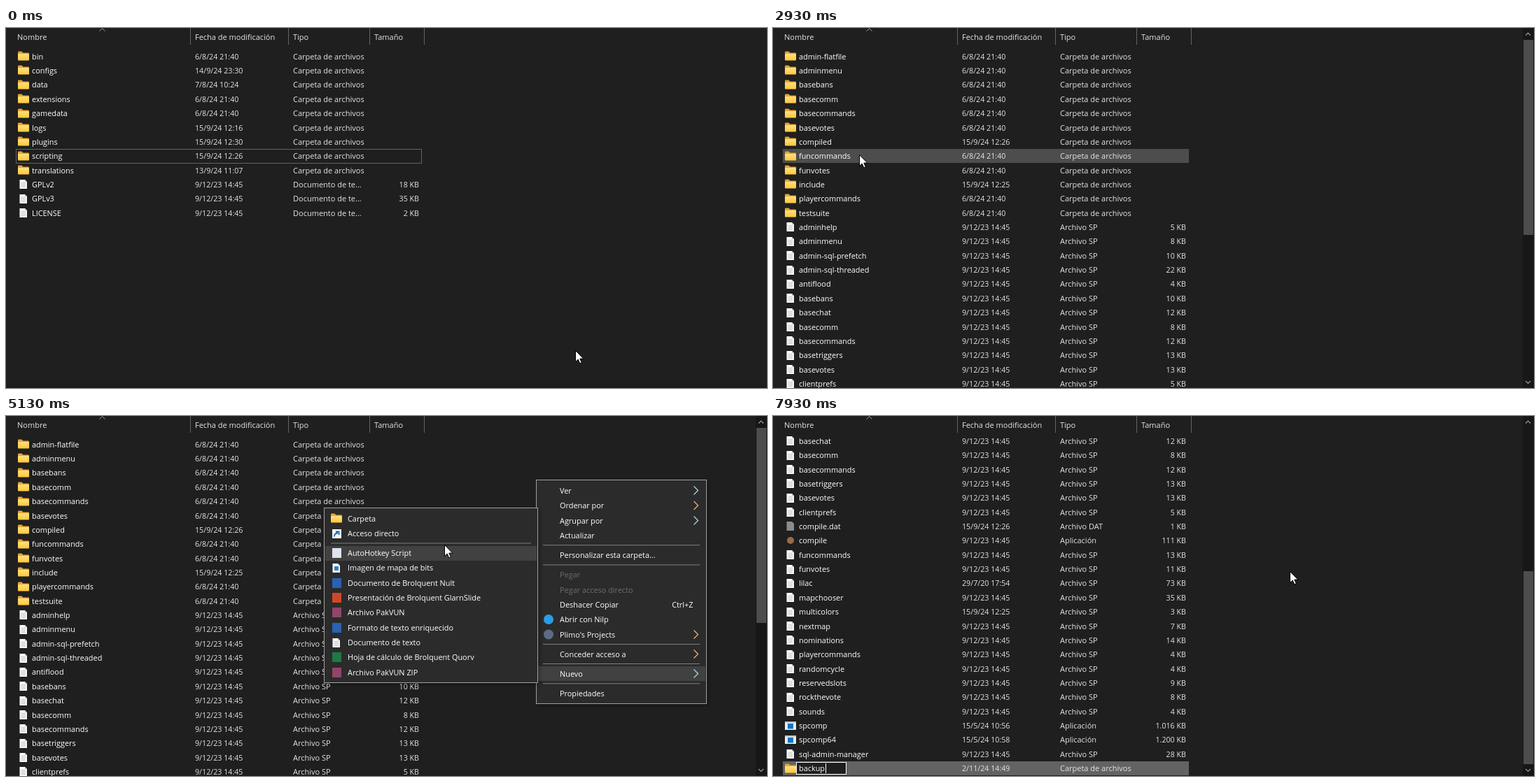
An HTML page for the animation above (8000 ms loop, 1087 by 515 pixels).

```html
<!DOCTYPE html>
<html lang="es">
<head>
<meta charset="utf-8">
<title>Explorador</title>
<style>
  html, body { margin: 0; width: 100%; height: 100%; overflow: hidden; background: #1f1f1f; }
  svg { display: block; }
  text { font: 500 10.9px "Open Sans", "Noto Sans", sans-serif; fill: #fff; }
  .meta { font-weight: 400; font-size: 11px; fill: #e4e4e4; }
  .num { font-weight: 400; font-size: 10.7px; fill: #e4e4e4; }
  .end { text-anchor: end; }
  .off { fill: #6d6d6d; }
  .panel { filter: drop-shadow(3px 3px 2px rgba(0, 0, 0, .25)); }
</style>
</head>
<body>
<svg id="stage" width="1087" height="515" viewBox="0 0 1087 515">
  <defs>
    <linearGradient id="gold" x2="0" y2="1">
      <stop stop-color="#ffdf80"/><stop offset="1" stop-color="#ffc838"/>
    </linearGradient>
    <g id="folder">
      <path d="M0 1.8Q0 .5 1.2.5H5.4L7.4 2.5H14.8Q16 2.5 16 3.7V8H0Z" fill="#e9a52f"/>
      <rect y="4" width="16" height="9.5" rx="1" fill="url(#gold)"/>
    </g>
    <g id="doc">
      <path d="M2.5 1H10L13 4V14H2.5Z" fill="#f8f8f8"/>
      <path d="M10 1V4H13" fill="#c4c4c4"/>
      <path d="M4.5 5.5H11M4.5 7.5H11M4.5 9.5H11M4.5 11.5H11" stroke="#b4b4b4" stroke-width=".7"/>
    </g>
    <path id="dat" d="M2.5 1H10L13 4V14H2.5Z" fill="#8b8b8b"/>
    <circle id="brown" cx="8" cy="7" r="5" fill="#9a6b45"/>
    <g id="app">
      <rect y="1" width="16" height="12" fill="#e9eef2"/>
      <rect y="1" width="16" height="2" fill="#b9c4cc"/>
      <rect x="4" y="4" width="8" height="7.5" fill="#0a78c8"/>
    </g>
    <g id="link">
      <rect x="2" y="1" width="13" height="13" fill="#f4f4f4"/>
      <path d="M5 11.5C5 8 7 6.5 10 6.5M7 4.5H11.5V9" fill="none" stroke="#1769b5" stroke-width="1.8"/>
    </g>
    <g id="bitmap">
      <path d="M2.5 1H10L13 4V14H2.5Z" fill="#f8f8f8"/>
      <rect x="5" y="5" width="6" height="6" fill="#2b7fd0"/>
    </g>
    <path id="arrow" d="M.5.5V16.6L4.2 13.1 6.8 18.8 9.3 17.7 6.8 12.1H11.8Z" fill="#fff" stroke="#000"/>
  </defs>
  <g id="scene"></g>
</svg>
<script>
const LOOP = 8000, TICK = 1000 / 15, PITCH = 20.36;
const TOP = 40.6, TOP_SCROLLED = 35.8;
const scene = document.getElementById('scene');
const measure = document.createElement('canvas').getContext('2d');

const KINDS = {
  d: ['folder', 'Carpeta de archivos', '6/8/24 21:40'],
  t: ['doc', 'Documento de te...', '9/12/23 14:45'],
  s: ['doc', 'Archivo SP', '9/12/23 14:45'],
  x: ['dat', 'Archivo DAT', '15/9/24 12:26'],
  c: ['brown', 'Aplicación', '9/12/23 14:45'],
  a: ['app', 'Aplicación', '15/5/24 10:56']
};

// Each entry: kind:name:size:date, with the date defaulting to the kind's own.
const parse = list => list.trim().split(/\s*,\s*/).map(entry => {
  const [kind, name, size, ...date] = entry.split(':');
  const [icon, type, usual] = KINDS[kind];
  return { icon, name, type, size: size ? size + ' KB' : '', date: date.join(':') || usual };
});

const rootRows = parse(`d:bin, d:configs::14/9/24 23:30, d:data::7/8/24 10:24, d:extensions, d:gamedata,
  d:logs::15/9/24 12:16, d:plugins::15/9/24 12:30, d:scripting::15/9/24 12:26,
  d:translations::13/9/24 11:07, t:GPLv2:18, t:GPLv3:35, t:LICENSE:2`);
const scriptRows = parse(`d:admin-flatfile, d:adminmenu, d:basebans, d:basecomm, d:basecommands, d:basevotes,
  d:compiled::15/9/24 12:26, d:funcommands, d:funvotes, d:include::15/9/24 12:25, d:playercommands, d:testsuite,
  s:adminhelp:5, s:adminmenu:8, s:admin-sql-prefetch:10, s:admin-sql-threaded:22, s:antiflood:4, s:basebans:10,
  s:basechat:12, s:basecomm:8, s:basecommands:12, s:basetriggers:13, s:basevotes:13, s:clientprefs:5,
  x:compile.dat:1, c:compile:111, s:funcommands:13, s:funvotes:11, s:lilac:73:29/7/20 17:54, s:mapchooser:35,
  s:multicolors:3:15/9/24 12:25, s:nextmap:7, s:nominations:14, s:playercommands:4, s:randomcycle:4,
  s:reservedslots:9, s:rockthevote:8, s:sounds:4, a:spcomp:1.016, a:spcomp64:1.200:15/5/24 10:58,
  s:sql-admin-manager:28, d:::2/11/24 14:49`);

const BLUE = '#b5dbe8', AMBER = '#f0b878';
const mainMenu = [
  { y: 106.5, label: 'Ver', more: BLUE }, { y: 128, label: 'Ordenar por', more: AMBER },
  { y: 149.5, label: 'Agrupar por', more: BLUE }, { y: 170.5, label: 'Actualizar' },
  { y: 199, label: 'Personalizar esta carpeta...' },
  { y: 227, label: 'Pegar', off: true }, { y: 248.5, label: 'Pegar acceso directo', off: true },
  { y: 269.5, label: 'Deshacer Copiar', keys: 'Ctrl+Z' },
  { y: 291, label: 'Abrir con Nilp', dot: '#2a9de4' },
  { y: 312.5, label: "Plimo's Projects", dot: '#5d6c84', more: AMBER },
  { y: 340.5, label: 'Conceder acceso a', more: AMBER }, { y: 368.5, label: 'Nuevo', more: BLUE },
  { y: 397, label: 'Propiedades' }
];
const subMenu = [
  { y: 146.5, label: 'Carpeta', icon: 'folder' }, { y: 168, label: 'Acceso directo', icon: 'link' },
  { y: 196, label: 'AutoHotkey Script', box: '#dfe3ee' },
  { y: 217.3, label: 'Imagen de mapa de bits', icon: 'bitmap' },
  { y: 238.7, label: 'Documento de Brolquent Nult', box: '#2b62b0' },
  { y: 260, label: 'Presentación de Brolquent GlarnSlide', box: '#d04727' },
  { y: 281.3, label: 'Archivo PakVUN', box: '#91456a' },
  { y: 302.6, label: 'Formato de texto enriquecido', box: '#2b62b0' },
  { y: 324, label: 'Documento de texto', icon: 'doc' },
  { y: 345.3, label: 'Hoja de cálculo de Brolquent Quorv', box: '#1f7846' },
  { y: 366.6, label: 'Archivo PakVUN ZIP', box: '#91456a' }
];

// Pointer stretches as [tick, x, y]; it is out of sight between stretches.
const pointerRuns = [
  [[0, 813, 461], [4, 813, 461], [5, 730, 468], [6, 520, 488], [7, 327, 508]],
  [[17, 584, 503], [18, 645, 480], [20, 850, 436], [22, 1035, 408], [23, 1076, 403], [25, 1076, 403],
   [26, 1025, 394], [27, 850, 350], [28, 620, 285], [29, 400, 230], [30, 230, 197], [31, 145, 184],
   [32, 123, 181], [44, 123, 181], [47, 400, 235], [50, 679, 300], [52, 679, 300], [58, 757, 357],
   [66, 757, 357], [69, 788, 371], [73, 788, 371], [75, 715, 310], [77, 626, 184], [79, 597, 147],
   [80, 597, 146], [81, 597, 146], [86, 682, 147], [99, 682, 147]],
  [[115, 682, 147], [116, 591, 190], [117, 650, 277], [118, 748, 255], [119, 738, 222]]
];
const typing = [[87, 'Nueva carpeta'], [92, 'b'], [94, 'ba'], [96, 'bac'], [98, 'back'], [100, 'backu'], [102, 'backup']];

const rect = (x, y, w, h, fill, extra = '') =>
  `<rect x="${x}" y="${y}" width="${w}" height="${h}" fill="${fill}" ${extra}/>`;
const frame = (x, y, w, h, fill, line, extra = '') =>
  rect(x + .5, y + .5, w - 1, h - 1, fill, `stroke="${line}" ${extra}`);
const line = (d, color, width = 1) => `<path d="${d}" fill="none" stroke="${color}" stroke-width="${width}"/>`;
const use = (id, x, y) => `<use href="#${id}" x="${x}" y="${y}"/>`;
const text = (x, center, label, cls = '') =>
  `<text x="${x}" y="${Math.round(center + 4.1)}" class="${cls}">${label}</text>`;
const textWidth = label => {
  measure.font = '500 10.9px "Open Sans", "Noto Sans", sans-serif';
  return Math.round(measure.measureText(label).width);
};

function pointerAt(tick) {
  const run = pointerRuns.find(r => tick >= r[0][0] && tick <= r[r.length - 1][0]);
  if (!run) return null;
  const next = run.findIndex(p => p[0] >= tick);
  const [t1, x1, y1] = run[next], [t0, x0, y0] = run[Math.max(0, next - 1)];
  const k = t1 === t0 ? 1 : (tick - t0) / (t1 - t0);
  return { x: Math.round(x0 + (x1 - x0) * k), y: Math.round(y0 + (y1 - y0) * k) };
}

function header() {
  const titles = [[16, 'Nombre'], [270, 'Fecha de modificación'], [410, 'Tipo'], [526, 'Tamaño']];
  return rect(0, 0, 1070, 24, '#1f1f1f') +
    titles.map(([x, label]) => text(x, 12.6, label, 'meta')).join('') +
    [263, 403, 519, 597].map(x => rect(x, 0, 1, 24, '#636363')).join('') +
    line('M133.5 4.5L137.5.7 141.5 4.5', '#a0a0a0');
}

function rowMarkup(row, c) {
  return use(row.icon, 17, Math.round(c - 7.5)) + text(37, c, row.name) + text(270, c, row.date, 'num') +
    text(410, c, row.type, 'meta') + text(590, c, row.size, 'num end');
}

function listing(rows, top, highlight) {
  return rows.map((row, i) => {
    const c = top + i * PITCH;
    return (highlight(i, Math.round(c - 10)) || '') + rowMarkup(row, c);
  }).join('');
}

function scrollbar(y, height) {
  return rect(1071, 0, 16, 515, '#171717') + rect(1072, y, 14, height, '#4d4d4d') +
    line('M1075 10.5L1078.5 7 1082 10.5M1075 505L1078.5 508.5 1082 505', '#9a9a9a', 1.2);
}

function nameBox(label) {
  const fresh = label === 'Nueva carpeta', w = textWidth(label);
  return frame(33, 495, w + 35, 18, '#1f1f1f', '#fff') +
    (fresh ? rect(37, 497, w, 15, '#0078d7') : rect(38 + w, 497, 1, 14, '#fff')) + text(37, 504, label);
}

function halfDrawnName() {
  const w = textWidth('Nueva carpeta');
  return rect(34, 496, 108, 17, '#1f1f1f') + rect(143, 496, 222, 19, '#636363') +
    line('M34 512.5H142.5V496', '#fff') + rect(37, 497, w, 15, '#0078d7') +
    text(37, 504, 'Nueva carpeta') + text(270, 504, '2/11/24 14:49', 'num');
}

function separators(items, x, w) {
  return items.slice(1).map((item, i) => {
    const above = items[i].y;
    return item.y - above > 25 ? rect(x + 10, (item.y + above) / 2 - .5, w - 20, 1, '#808080') : '';
  }).join('');
}

function menu(items, box, active) {
  const [x, y, w, h] = box;
  return frame(x, y, w, h, '#2b2b2b', '#a0a0a0', 'class="panel"') + separators(items, x, w) +
    items.map(item => {
      const c = item.y, top = Math.round(c - 10.5);
      return (item === active ? rect(x + 2, top, w - 4, 21, '#414141') : '') +
        (item.icon ? use(item.icon, x + 10, Math.round(c - 7.5)) : '') +
        (item.box ? rect(x + 12, Math.round(c - 7), 13, 14, item.box) : '') +
        (item.dot ? `<circle cx="${x + 18}" cy="${c}" r="7" fill="${item.dot}"/>` : '') +
        text(x + 34, c, item.label, item.off ? 'off' : '') +
        (item.keys ? text(x + 224.5, c, item.keys, 'end') : '') +
        (item.more ? line(`M${x + 225.5} ${c - 6}l6 6-6 6`, item.more, 1.2) : '');
    }).join('');
}

function menus(tick, pointer) {
  const under = (items, left, right) => pointer.x > left && pointer.x < right &&
    items.find(item => pointer.y >= item.y - 12 && pointer.y < item.y + 9.4);
  const open = tick >= 72;
  const active = open ? mainMenu[11] : under(mainMenu, 758, 1000);
  return `<g opacity="${tick === 60 ? .6 : 1}">` +
    menu(mainMenu, [757, 91, 244, 321], active) + '</g>' +
    (open ? menu(subMenu, [454, 131, 306, 251], under(subMenu, 455, 757)) : '');
}

function render(tick) {
  const pointer = pointerAt(tick);
  const hovered = y => pointer && pointer.x >= 14 && pointer.x < 594 && pointer.y >= y && pointer.y < y + 20;
  const fill = (y, color) => rect(14, y, 580, 20, color);
  const hover = (i, y) => hovered(y) && fill(y, '#4d4d4d');
  let out;
  if (tick < 41) {
    out = rect(0, 511, 1087, 4, '#1c1c1c') + listing(rootRows, TOP, (i, y) => {
      if (i === 7 && tick >= 36) return fill(y, '#636363');
      return hover(i, y) || (i === 7 && frame(14, y, 580, 21, 'none', '#636363'));
    });
  } else if (tick < 87) {
    const menuOpen = tick >= 60 && tick < 82;
    out = listing(scriptRows.slice(0, 24), TOP, menuOpen ? () => '' : hover);
    if (tick === 86) out += halfDrawnName();
  } else {
    const label = typing.filter(step => step[0] <= tick).pop()[1];
    out = listing(scriptRows.slice(18), TOP_SCROLLED, (i, y) => i === 23 && fill(y, '#636363')) + nameBox(label);
  }
  out += header();
  if (tick >= 41) out += tick < 84 ? scrollbar(17, 279) : scrollbar(222, 276);
  if (tick >= 60 && tick < 82) out += menus(tick, pointer);
  if (pointer) out += use('arrow', pointer.x, pointer.y);
  scene.innerHTML = out;
}

let shown = -1;
const start = performance.now();
function step() {
  const time = (performance.now() - start) % LOOP;
  const tick = Math.min(119, Math.floor((time + 4) / TICK));
  if (tick !== shown) render(shown = tick);
  requestAnimationFrame(step);
}
step();
</script>
</body>
</html>
```
